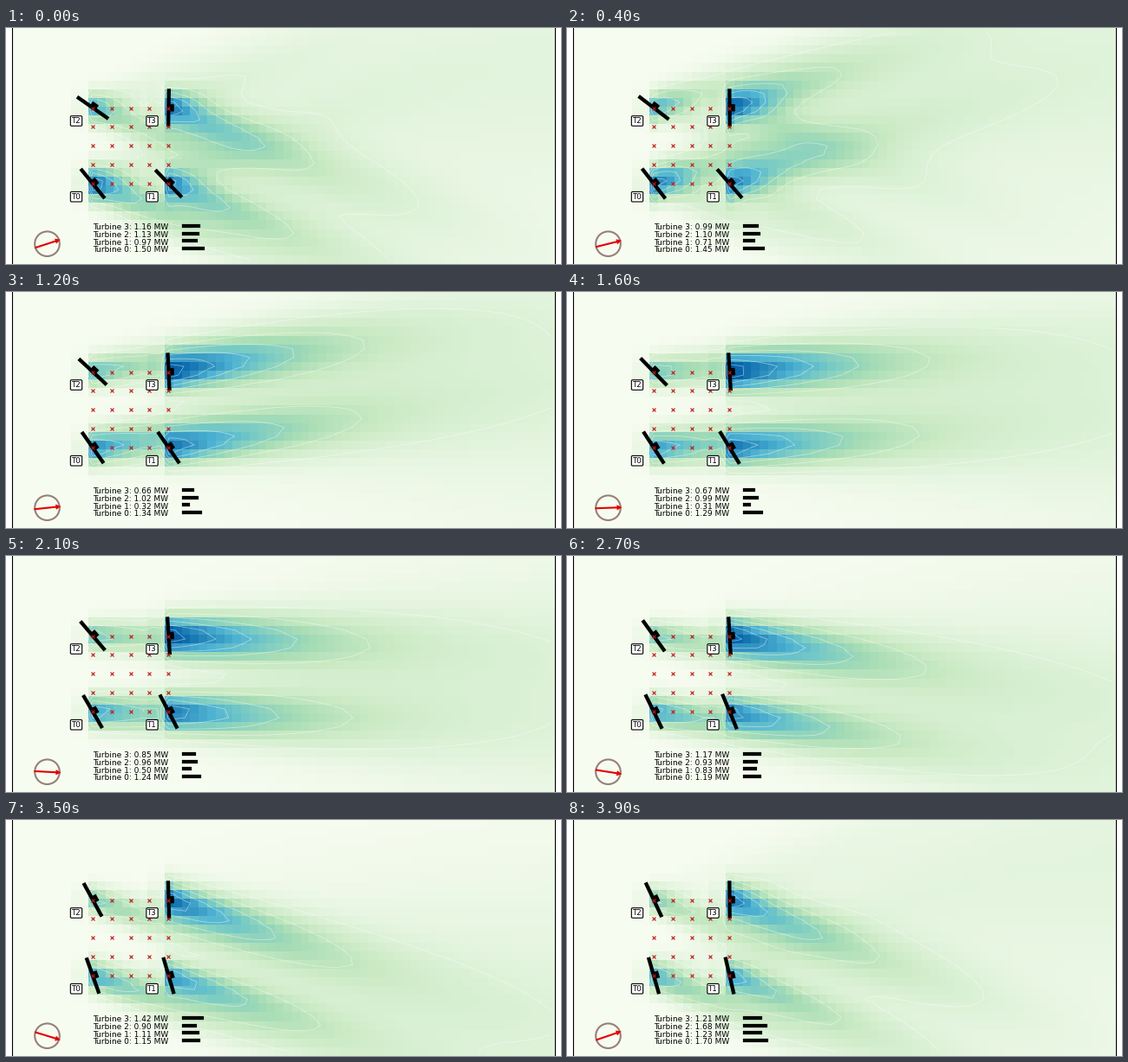
Write a matplotlib script that moves like this. It is 640x273 px and loops after 4 s.

```python
import numpy as np
import matplotlib.pyplot as plt
from matplotlib.animation import FuncAnimation
from matplotlib.patches import Circle

W, H, DPI = 640, 273, 100
FRAMES, INTERVAL = 40, 100
LEFT, RIGHT = 7, 633
COLS, ROWS = 64, 27
PT = 72 / DPI  # points per pixel
REACH = 140    # wake decay length in pixels

cell_w, cell_h = (RIGHT - LEFT) / COLS, H / ROWS
X, Y = np.meshgrid(LEFT + (np.arange(COLS) + .5) * cell_w,
                   (np.arange(ROWS) + .5) * cell_h)


def gauss(d, sigma):
    return np.exp(-.5 * (d / sigma) ** 2)


def wind_age(k):
    """Frames since the wind last swung back up."""
    return (k + 1) % FRAMES + 1


def wind(k):
    """Wind angle in degrees: one degree down per frame, then a jump back."""
    return 20 - wind_age(k)


class Turbine:
    def __init__(self, x, y, start, end, bend, loss):
        self.x, self.y = x, y
        self.start, self.end, self.bend = start, end, bend
        self.loss = loss  # share of power lost inside an upstream wake

    def yaw(self, k):
        u = k / (FRAMES - 1)
        return (self.start + (self.end - self.start) * u
                + self.bend * np.sin(np.pi * u))

    def power(self, k):
        aligned = np.cos(np.radians(self.yaw(k) - wind(k))) ** 1.8
        return 1.7 * aligned * (1 - self.loss * gauss(wind(k) - 4, 10.3))

    def wake(self, k):
        """Speed deficit; after a swing the old wake fades into the new."""
        dx = X - self.x
        s = np.maximum(dx, 0)
        facing = np.cos(np.radians(self.yaw(k) - wind(k - 1)))
        sigma = 15.5 * facing + .05 * s

        def across(angle):
            slope = np.tan(np.radians(1.1 * angle + 1.2))
            return gauss(Y - self.y + slope * s, sigma)

        mix = np.minimum(1, wind_age(k) / 10 * (1 + np.exp(-s / 30)))
        shape = mix * across(wind(k)) + (1 - mix) * across(-20)
        start = np.where(dx > -5, 1, np.where(dx > -25, .1, 0))
        return .95 * facing ** 2 * start * np.exp(-s / REACH) * shape


TURBINES = [
    Turbine(100, 180, 39, 16, 3.5, 0),
    Turbine(187.5, 180, 44, 13, 0, .78),
    Turbine(100, 92.3, 55, 25, 1.5, 0),
    Turbine(187.5, 92.3, -1, .5, 4, .62),
]


def field(k):
    """Deficit of the whole farm, with a broad haze far downstream."""
    s = np.maximum(X - 150, 0)
    drift = .5 * np.tan(np.radians(wind(k))) * s
    clear = 1 - (.11 * (1 - np.exp(-s / 150))
                 * gauss(Y - 136 + drift, 45 + .15 * s))
    for t in TURBINES:
        clear *= 1 - t.wake(k)
    return 1 - clear


fig = plt.figure(figsize=(W / DPI, H / DPI), dpi=DPI, facecolor="white")
ax = fig.add_axes([0, 0, 1, 1])
ax.axis("off")

image = ax.imshow(field(0), cmap="GnBu", vmin=0, vmax=1, aspect="auto",
                  interpolation="nearest", extent=(LEFT, RIGHT, H, 0))
ax.set_xlim(0, W)
ax.set_ylim(H, 0)
for x in (LEFT, RIGHT):
    ax.plot([x, x], [-2, H + 2], color="black", lw=.8, zorder=3)

gx, gy = np.meshgrid(100 + 21.8 * np.arange(5), 92.5 + 21.9 * np.arange(5))
ax.plot(gx.ravel(), gy.ravel(), "x", color="#c01818", ms=3, mew=.8, zorder=6)


def stroke(width, color="black", cap="butt", z=5):
    return ax.plot([], [], color=color, lw=width * PT,
                   solid_capstyle=cap, zorder=z)[0]


blades, hubs, bars, texts = [], [], [], []
for i, t in enumerate(TURBINES):
    blades.append(stroke(4.3))
    hubs.append(stroke(8.3))
    bars.append(stroke(4.2, cap="projecting"))
    texts.append(ax.text(100.2, 233.2 + 8.7 * (3 - i), "", fontsize=6.45,
                         family="DejaVu Sans", zorder=7))
    ax.text(t.x - 19, t.y + 15.2, f"T{i}", fontsize=6.2,
            family="DejaVu Sans", ha="center", va="center", zorder=7,
            bbox=dict(boxstyle="round,pad=0.15", fc="white", ec="black",
                      lw=.8))

CX, CY = 47.5, 249.7
RED = "#e60000"
ax.add_patch(Circle((CX, CY), 14.3, fill=False, ec="#968078", lw=1.5,
                    zorder=5))
shaft = stroke(2.1, color=RED, z=6)
head = ax.fill([0, 0, 0], [0, 0, 0], color=RED, lw=0, zorder=6)[0]

LEVELS = np.arange(1, 7) / 7
contours = None


def update(k):
    global contours
    data = field(k)
    image.set_data(data)
    if contours is not None:
        contours.remove()
    contours = ax.contour(X, Y, data, levels=LEVELS, colors="white",
                          linewidths=.6, alpha=.45, zorder=2)

    for i, t in enumerate(TURBINES):
        a = np.radians(t.yaw(k))
        nx, ny = np.cos(a), -np.sin(a)
        r = np.array([-22, 22])
        blades[i].set_data(t.x - ny * r, t.y + nx * r)
        hubs[i].set_data([t.x, t.x + 6.3 * nx], [t.y, t.y + 6.3 * ny])
        power = t.power(k)
        y = 229 + 8.7 * (3 - i)
        bars[i].set_data([205, 205 + 14.5 * power], [y, y])
        texts[i].set_text(f"Turbine {i}: {power:.2f} MW")

    a = np.radians(wind(k))
    ux, uy = np.cos(a), -np.sin(a)
    shaft.set_data([CX - 15 * ux, CX + 12 * ux], [CY - 15 * uy, CY + 12 * uy])
    along = np.array([16, 10, 10])
    side = np.array([0, 3.1, -3.1])
    head.set_xy(np.column_stack([CX + along * ux - side * uy,
                                 CY + along * uy + side * ux]))
    return []


anim = FuncAnimation(fig, update, frames=FRAMES, interval=INTERVAL,
                     repeat=True, repeat_delay=0, blit=False)
plt.show()
```
